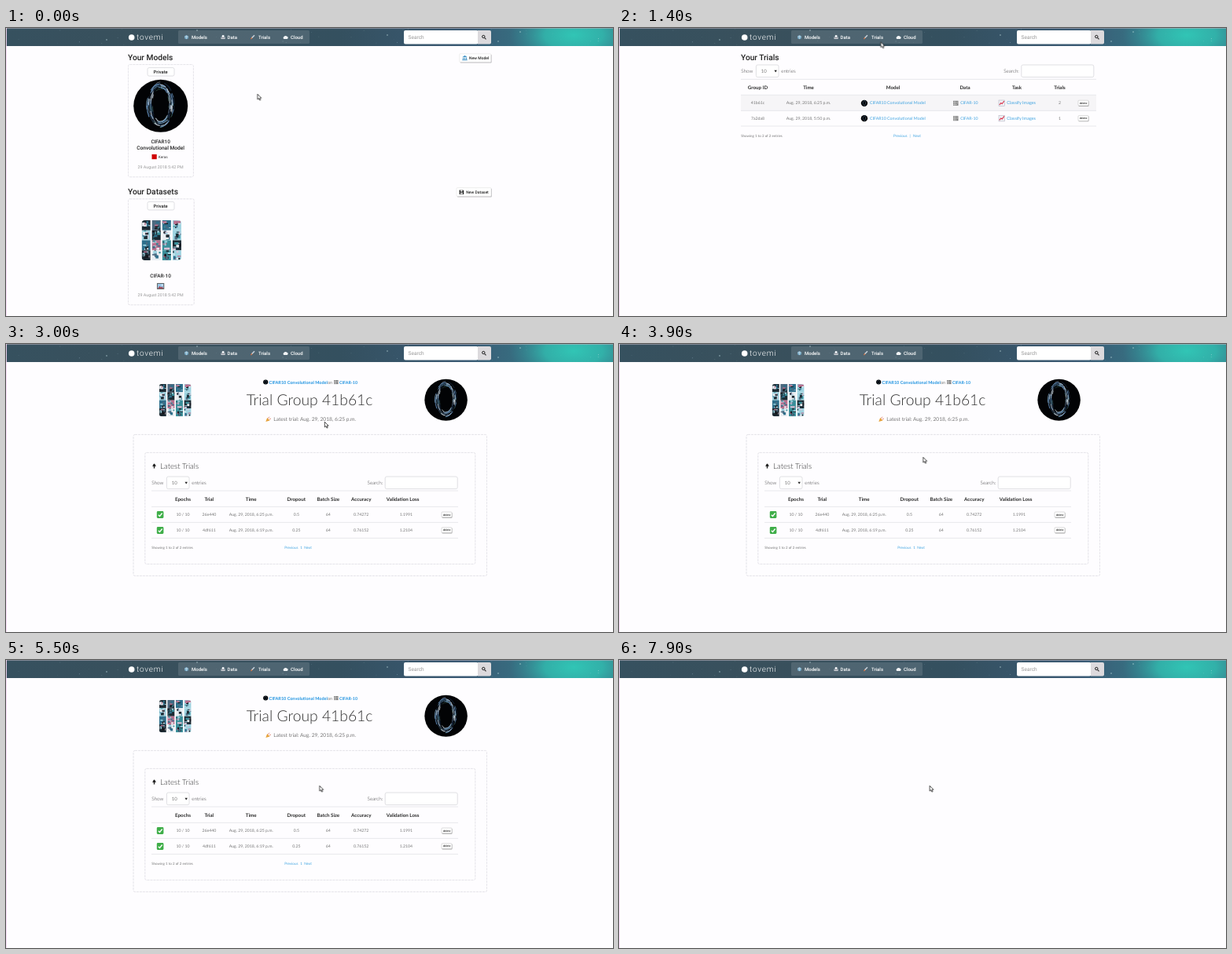
An HTML page for the animation above (8 s loop, 772 px wide and 367 px high).

```html
<!DOCTYPE html>
<html lang="en">
<head>
<meta charset="utf-8">
<title>Model dashboard</title>
<style>
  html, body { margin: 0; width: 100%; height: 100%; overflow: hidden; background: #fefdff; }
  svg { display: block; width: 772px; height: 367px; }
  text { font-family: Lato, "Open Sans", sans-serif; font-weight: 300; fill: #333; text-rendering: geometricPrecision; white-space: pre; }
  .ui { font-family: Roboto, "Noto Sans", sans-serif; font-weight: 400; }
  .mid { font-weight: 500; fill: #222; }
  .nav { font-weight: 500; fill: #fff; }
  .bold { font-weight: 700; fill: #2b2b2b; }
  .cell { font-weight: 400; fill: #777; }
  .link { font-weight: 400; fill: #3fa3e0; }
  .blink { font-weight: 700; fill: #1f93e0; }
  .date { fill: #999; }
  .c { text-anchor: middle; }
  .box { fill: #fff; stroke: #d8d8dc; stroke-width: .8; }
  .card { fill: none; stroke: #dedce2; stroke-width: .8; stroke-dasharray: 3 1; }
  .rule { stroke: #e4e3e8; stroke-width: .8; }

  #home, #trials, #group, #hover, #arrow, #hand { animation: 8s step-end infinite; }
  #home { animation-name: home; }
  #trials { animation-name: trials; }
  #group { animation-name: group; }
  #hover { animation-name: hover; }
  #arrow { animation-name: arrow; }
  #hand { animation-name: hand; }
  #cursor { animation: move 8s ease-in-out infinite; }
  @keyframes home { 0% { opacity: 1 } 16.25%, 100% { opacity: 0 } }
  @keyframes trials { 0% { opacity: 0 } 16.25% { opacity: 1 } 37.5%, 100% { opacity: 0 } }
  @keyframes group { 0% { opacity: 0 } 37.5% { opacity: 1 } 87.5%, 100% { opacity: 0 } }
  @keyframes hover { 0% { opacity: 0 } 8.75% { opacity: 1 } 16.25%, 100% { opacity: 0 } }
  @keyframes arrow { 0% { opacity: 1 } 21.25% { opacity: 0 } 37.5%, 100% { opacity: 1 } }
  @keyframes hand { 0% { opacity: 0 } 21.25% { opacity: 1 } 37.5%, 100% { opacity: 0 } }
  @keyframes move {
    0% { transform: translate(319.5px, 84px) }
    9.5%, 16.25% { transform: translate(328.5px, 13px) }
    24%, 38% { transform: translate(405px, 99px) }
    46%, 49% { transform: translate(386.5px, 144px) }
    58%, 70% { transform: translate(398.5px, 160px) }
    83%, 88% { transform: translate(397.3px, 160px) }
    98%, 100% { transform: translate(394.8px, 160px) }
  }
</style>
</head>
<body>
<svg viewBox="0 0 772 367">
  <defs>
    <linearGradient id="sky">
      <stop offset="0" stop-color="#36515f"/>
      <stop offset=".25" stop-color="#39505c"/>
      <stop offset=".55" stop-color="#34505f"/>
      <stop offset=".76" stop-color="#3a5a74"/>
      <stop offset=".84" stop-color="#376d80"/>
      <stop offset="1" stop-color="#37838e"/>
    </linearGradient>
    <radialGradient id="teal">
      <stop offset="0" stop-color="#31c5b5"/>
      <stop offset=".45" stop-color="#31b9ae" stop-opacity=".85"/>
      <stop offset="1" stop-color="#34909a" stop-opacity="0"/>
    </radialGradient>
    <clipPath id="bar"><rect width="772" height="23"/></clipPath>
    <clipPath id="tiles"><rect width="50.5" height="51" rx="4"/></clipPath>
    <filter id="soft" x="-20%" y="-20%" width="140%" height="140%"><feGaussianBlur stdDeviation=".45"/></filter>
    <g id="mosaic" clip-path="url(#tiles)"></g>
    <g id="orb"></g>
    <g id="grid">
      <rect width="6.5" height="6" fill="#777"/>
      <path d="M0 1.5H6.5M0 3.2H6.5M0 4.8H5M2 0V6" stroke="#ddd" stroke-width=".6"/>
    </g>
    <g id="chart">
      <rect width="7.5" height="7.5" fill="#f0f1f4" stroke="#aab" stroke-width=".5"/>
      <path d="M.8 6L2.8 3.6L4.3 4.6L6.8 1" fill="none" stroke="#d8304a" stroke-width="1.1"/>
    </g>
    <g id="check">
      <rect width="8.6" height="8.8" rx="1.3" fill="#3fae49"/>
      <path d="M2 4.6L3.7 6.4L6.8 2.4" fill="none" stroke="#fff" stroke-width="1.3"/>
    </g>
    <g id="delete">
      <rect x=".5" y=".7" width="13" height="7" rx="1" fill="#aaa"/>
      <rect width="13" height="6.8" rx="1" fill="#fff" stroke="#bbb" stroke-width=".5"/>
      <text class="bold c" x="6.5" y="4.6" font-size="3.5">delete</text>
    </g>
  </defs>

  <rect width="772" height="367" fill="#fefdff"/>
  <g id="home"></g>
  <g id="trials"></g>
  <g id="group"></g>

  <g clip-path="url(#bar)">
    <rect width="772" height="23" fill="url(#sky)"/>
    <ellipse cx="722" cy="9" rx="82" ry="42" fill="url(#teal)"/>
    <g id="stars"></g>
    <rect width="772" height=".8" fill="#b9b5c0" opacity=".7"/>
  </g>
  <g id="header">
    <circle cx="159.7" cy="12" r="3.8" fill="#fff"/>
    <rect x="219" y="3" width="167" height="17" rx="1.5" fill="#fff" opacity=".12"/>
    <rect id="hover" x="303" y="3" width="41" height="17" fill="#ffffff28"/>
    <circle cx="229.5" cy="11.8" r="2.5" fill="#75a9c6"/>
    <path d="M227.3 11H231.7M229.5 9.5V14" stroke="#d7e6ee" stroke-width=".6"/>
    <path d="M274.8 9H277.4V11.5H278.5V14H273.6V11.5H274.8Z" fill="#e9edf0"/>
    <path d="M274 12.6H278" stroke="#445" stroke-width=".7"/>
    <path d="M311.5 14L313.2 12" stroke="#df7a49" stroke-width="1.2"/>
    <path d="M312.7 12.5L316 9.3" stroke="#c9d3dc" stroke-width="1.5"/>
    <path d="M353.5 14A1.7 1.7 0 0 1 353.6 11A2.3 2.3 0 0 1 357.4 10.8A1.7 1.7 0 0 1 357.6 14Z" fill="#f3f6f8"/>
    <rect x="506" y="3" width="94.5" height="17.5" rx="2" fill="#fff"/>
    <path d="M600 3H615A2 2 0 0 1 617 5V18.5A2 2 0 0 1 615 20.5H600Z" fill="#dcdadd"/>
    <circle cx="607.3" cy="11" r="1.7" fill="none" stroke="#222" stroke-width="1"/>
    <path d="M608.5 12.3L610.5 14.4" stroke="#222" stroke-width="1.1"/>
  </g>
  <rect width=".9" height="367" fill="#f4d7f4"/>

  <g id="cursor">
    <path id="arrow" d="M.3 .2V7L1.9 5.6L3 8.1L4.2 7.6L3.1 5.2H5.2Z" fill="#fff" stroke="#222" stroke-width=".8"/>
    <path id="hand" d="M.2 .8Q.8 -.1 1.4 .8V3L4.2 3.4Q5.3 3.7 5.2 4.7L4.6 7.6H.4L-1.7 4.8Q-1.5 3.8 -.5 4.3L.2 4.8Z" fill="#fff" stroke="#222" stroke-width=".8"/>
  </g>
</svg>

<script>
const $ = id => document.getElementById(id);
const add = (id, html) => $(id).insertAdjacentHTML("beforeend", html);
const text = (x, y, size, cls, str) => `<text x="${x}" y="${y}" font-size="${size}" class="${cls}">${str}</text>`;
const use = (id, x, y, scale = 1) => `<use href="#${id}" transform="translate(${x} ${y}) scale(${scale})"/>`;
const rect = (x, y, w, h, cls, rx = 2) => `<rect x="${x}" y="${y}" width="${w}" height="${h}" rx="${rx}" class="${cls}"/>`;
const rule = (x1, x2, y) => `<path class="rule" d="M${x1} ${y}H${x2}"/>`;

let seed = 29;
const rand = (lo, hi) => {
  seed = (seed * 16807) % 2147483647;
  return lo + (hi - lo) * seed / 2147483647;
};
const pick = list => list[Math.floor(rand(0, list.length))];
const block = (x, y, w, h, fill) =>
  `<rect x="${x.toFixed(1)}" y="${y.toFixed(1)}" width="${w.toFixed(1)}" height="${h.toFixed(1)}" fill="${fill}"/>`;

// Picture collage: four strips of four small scenes
const scene = ["#1c2a33", "#2d6f8c", "#9fd3e0", "#e9eef2", "#b9708f", "#3a8f9a", "#17191f", "#d9c4d8", "#4d6a80"];
for (let col = 0; col < 4; col++) {
  for (let row = 0; row < 4; row++) {
    const x = col * 13.1, y = row * 12.75;
    let tile = block(x, y, 11, 12.75, pick(scene));
    for (let i = 0; i < 9; i++) {
      const w = rand(1, 5), h = rand(1, 4.5);
      tile += block(x + rand(0, 11 - w), y + rand(0, 12.7 - h), w, h, pick(scene));
    }
    add("mosaic", tile);
  }
}

// Glowing ring on a black disc
let ring = "";
for (let i = 0; i < 20; i++) {
  ring += `<ellipse cx="${rand(-1.5, 1.5)}" cy="${rand(-3.5, 0)}" rx="${rand(10.5, 17)}" ry="${rand(20, 28)}"
    stroke="${pick(["#dceaf5", "#6f9fd0", "#31588a", "#517f6c", "#8fb9d8", "#23405f"])}"
    stroke-width="${rand(.4, 1.5)}" stroke-dasharray="${rand(4, 18)} ${rand(8, 26)}"
    stroke-dashoffset="${rand(0, 60)}" opacity="${rand(.45, .95)}"/>`;
}
add("orb", `<ellipse rx="34.5" ry="33.5" fill="#020305"/><g fill="none" filter="url(#soft)">${ring}</g>`);

for (let i = 0; i < 60; i++) {
  add("stars", `<circle cx="${rand(0, 772)}" cy="${rand(1, 22)}" r="${rand(.2, .6)}" fill="#b8dce4" opacity="${rand(.15, .6)}"/>`);
}
add("stars", [[243, 3], [485, 9], [626, 17], [128, 15], [654, 5]]
  .map(([x, y]) => `<circle cx="${x}" cy="${y}" r=".7" fill="#d5edf0" opacity=".8"/>`).join(""));

add("header",
  `<text x="166" y="15.3" font-size="10" class="ui" letter-spacing=".8" style="fill:#fff;font-weight:300">tovemi</text>` +
  text(236, 13.8, 6, "ui nav", "Models") + text(281.5, 13.8, 6, "ui nav", "Data") +
  text(321, 13.8, 6, "ui nav", "Trials") + text(362, 13.8, 6, "ui nav", "Cloud") +
  text(511.5, 14, 6.6, "ui date", "Search"));

const button = (x, y, w, label) =>
  `<rect x="${x + .8}" y="${y + 1}" width="${w}" height="10.8" rx="1" fill="#b9b8bc"/>` +
  `<rect x="${x}" y="${y}" width="${w}" height="10.8" rx="1" fill="#fff" stroke="#ddd" stroke-width=".5"/>` +
  text(x + 12.3, y + 7.3, 5, "ui mid", label);
const badge = y => rect(180, y, 34, 10.5, "box") + text(196.6, y + 7.2, 5.8, "ui mid c", "Private");

add("home",
  text(155, 41.2, 10.2, "ui mid", "Your Models") + button(576.8, 32.8, 40, "New Model") +
  `<path d="M580.5 37L583.5 35L586.5 37ZM581 37.5H582V40H581ZM583 37.5H584V40H583ZM585 37.5H586V40H585ZM580.3 40.2H586.7V41.2H580.3Z" fill="#3b8fc4"/>` +
  rect(155.4, 46.6, 83, 143.2, "card") + badge(50.6) + use("orb", 196.7, 99.3) +
  text(196.6, 147.2, 6.4, "ui mid c", "CIFAR10") +
  text(196.6, 155.2, 6.6, "ui mid c", "Convolutional Model") +
  `<rect x="185.5" y="161" width="6.2" height="6.2" fill="#d00000"/>` +
  text(193.8, 165.8, 4.7, "ui", "Keras") +
  text(196.6, 178.6, 5.3, "ui date c", "29 August 2018 5:42 PM") +
  text(155, 212.2, 10.2, "ui mid", "Your Datasets") + button(573, 203.6, 44, "New Dataset") +
  `<path d="M576.6 206.4H581.4L582.2 207.2V212H576.6Z" fill="#222"/><path d="M578 206.6H580.6V208.4H578ZM577.8 209.8H581V211.6H577.8Z" fill="#eee"/>` +
  rect(155.4, 217.8, 83.8, 135, "card") + badge(221.4) + use("mosaic", 172.6, 245) +
  text(196.6, 318, 6.4, "ui mid c", "CIFAR-10") +
  `<rect x="192.4" y="325.6" width="8.4" height="6.8" fill="#9ac7e8" stroke="#555" stroke-width=".9"/><path d="M193 332L195.5 328.8L197 330.4L198.4 329.4L200.3 332Z" fill="#a34a58"/><circle cx="198.6" cy="327.6" r=".8" fill="#fff"/>` +
  text(196.6, 341.6, 5.3, "ui date c", "29 August 2018 5:42 PM"));

// Length menu and search field above a table
const controls = (x, y, searchX) =>
  text(x, y + 9.5, 6.3, "", "Show") + rect(x + 19.2, y, 28.6, 15.6, "box") +
  text(x + 25.5, y + 10.3, 6, "cell", "10") +
  `<path d="M${x + 42.3} ${y + 6.8}h3.4l-1.7 2.6z" fill="#222"/>` +
  text(x + 51, y + 9.5, 6.3, "", "entries") +
  text(searchX, y + 9.5, 6.3, "", "Search:") + rect(searchX + 22.6, y, 92, 15.6, "box");
const centred = (xs, y, size, cls, words) =>
  words.map((word, i) => text(xs[i], y, size, cls + " c", word)).join("");

const trialRow = (y, id, time, count) =>
  text(176.5, y, 5.2, "cell c", id) + text(241, y, 5.25, "cell c", time) +
  use("orb", 312, y - 1.6, .122) + text(319, y, 5.3, "link", "CIFAR10 Convolutional Model") +
  use("grid", 425, y - 4.6) + text(434.2, y, 5.2, "link", "CIFAR-10") +
  use("chart", 483, y - 5.4) + text(493.3, y, 5.5, "link", "Classify Images") +
  text(560.5, y, 5.2, "cell c", count) + use("delete", 584, y - 5.2);

add("trials",
  text(155, 41.2, 10.2, "ui mid", "Your Trials") + controls(155.2, 47, 489.2) +
  rule(155, 607, 65.4) + rule(155, 607, 85.4) +
  `<rect x="155" y="86" width="452" height="19.3" fill="#f6f5f7"/>` + rule(155, 607, 105.4) +
  centred([176.5, 241, 348.5, 440, 506, 560.5], 77.6, 6.2, "bold", ["Group ID", "Time", "Model", "Data", "Task", "Trials"]) +
  trialRow(97.4, "41b61c", "Aug. 29, 2018, 6:25 p.m.", 2) +
  trialRow(116.8, "7a2da8", "Aug. 29, 2018, 5:50 p.m.", 1) + rule(155, 607, 125) +
  text(155.2, 139, 4.45, "cell", "Showing 1 to 2 of 2 entries") +
  text(349, 139, 4.7, "link", "Previous") + text(369.5, 139, 4.7, "link", "|") + text(374, 139, 4.7, "link", "Next"));

const columns = [225, 258.3, 311.7, 369.3, 409.8, 451.7, 504.7];
const groupRow = (y, cells) =>
  use("check", 191.8, y - 6.2) +
  centred(columns, y, 5.2, "cell", cells.map(s => s === "1.1991" || s === "1.2104" ? s : s)) +
  (use("delete", 554, y - 5.2));

add("group",
  use("mosaic", 194.8, 51, .81) + use("orb", 559.6, 71.3, .79) +
  use("orb", 330.2, 48.6, .09) + text(334.5, 50.5, 5.5, "blink", "CIFAR10 Convolutional Model") +
  text(409, 50.5, 5.5, "cell", "on") + use("grid", 417, 46, .85) + text(424, 50.5, 5.3, "blink", "CIFAR-10") +
  text(386, 78, 19.3, "c", "Trial Group 41b61c") +
  `<path d="M330.3 99L332.2 94L335.6 97.4Z" fill="#e6a23c"/><path d="M333.4 94.6L335 92.8M335 96L336.8 95" stroke="#d9604f" stroke-width=".8"/>` +
  text(340.3, 98.2, 6.6, "cell", "Latest trial: Aug. 29, 2018, 6:25 p.m.") +
  rect(162, 115.4, 449.6, 180, "card") + rect(176.8, 138.4, 420, 142, "card") +
  `<path d="M188.5 152.2L191 155.8H189.2V158.5H187.8V155.8H186Z" fill="#222"/><circle cx="188.5" cy="154.4" r="1.5" fill="#222"/>` +
  text(196, 158.6, 9.8, "", "Latest Trials") + controls(185.2, 169, 459.6) +
  rule(185, 575, 187) + rule(185, 575, 207.4) + rule(185, 575, 227.4) + rule(185, 575, 247.4) +
  centred(columns, 199.8, 6.25, "bold", ["Epochs", "Trial", "Time", "Dropout", "Batch Size", "Accuracy", "Validation Loss"]) +
  use("check", 191.8, 213.1) + use("check", 191.8, 233.1) +
  centred([225, 258.3, 311.7, 369.3, 409.8, 451.7, 509], 219.4, 5.2, "cell",
    ["10 / 10", "26e440", "Aug. 29, 2018, 6:25 p.m.", "0.5", "64", "0.74272", "1.1991"]) +
  centred([225, 258.3, 311.7, 369.3, 409.8, 451.7, 509], 239.2, 5.2, "cell",
    ["10 / 10", "4df611", "Aug. 29, 2018, 6:19 p.m.", "0.25", "64", "0.76152", "1.2104"]) +
  use("delete", 554, 214) + use("delete", 554, 233.8) +
  text(185.2, 261, 4.45, "cell", "Showing 1 to 2 of 2 entries") +
  text(354.2, 261, 4.6, "link", "Previous") + text(374.2, 261, 4.6, "link", "1") + text(379.2, 261, 4.6, "link", "Next"));
</script>
</body>
</html>
```
